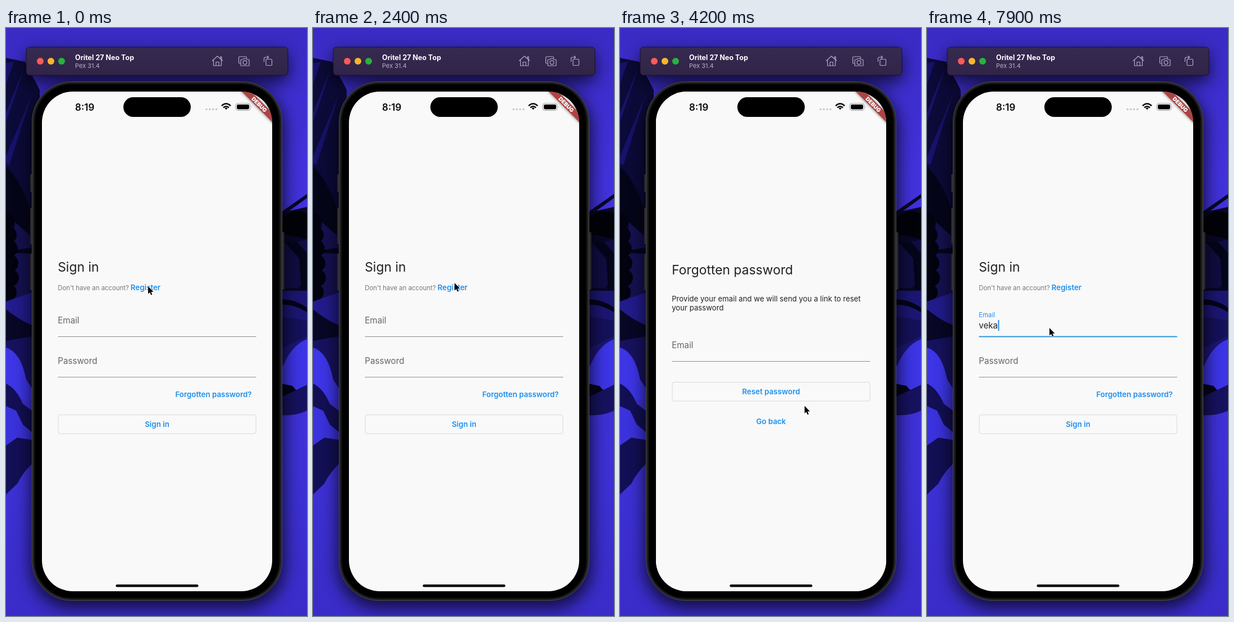
Animation, 536 px wide and 1045 px high, one loop 8 s. Source, as an HTML page:

```html
<!DOCTYPE html>
<html lang="en">
<head>
<meta charset="utf-8">
<title>Sign-in flow</title>
<style>
html, body { margin: 0; width: 100%; height: 100%; overflow: hidden; background: #3a2dcb; }
svg { display: block; width: 100vw; height: 100vh; font-family: Inter, Roboto, sans-serif; }
.h { font-size: 22.9px; fill: #212121; }
.label { font-size: 15.2px; fill: #666; }
.note { font-size: 11.4px; fill: #777; }
.body { font-size: 13.2px; fill: #222; }
.link { font-size: 13.35px; font-weight: 600; fill: #1e8fee; }
.mid { text-anchor: middle; }
.line { stroke: #8e8e8e; }
.btn { fill: none; stroke: #d8d8d8; }
.icon { fill: none; stroke: #b5a9cb; stroke-width: 1.2; stroke-linejoin: round; }
</style>
</head>
<body>
<svg viewBox="0 0 536 1045" preserveAspectRatio="none">
  <defs>
    <linearGradient id="sky" x2="0" y2="1">
      <stop stop-color="#3a2bc4"/><stop offset=".25" stop-color="#4232dc"/>
      <stop offset=".75" stop-color="#3d31d6"/><stop offset="1" stop-color="#3a2cc8"/>
    </linearGradient>
    <linearGradient id="bar" x2="0" y2="1">
      <stop stop-color="#372a51"/><stop offset="1" stop-color="#302447"/>
    </linearGradient>
    <linearGradient id="edge">
      <stop stop-color="#000" stop-opacity="0"/><stop offset="1" stop-color="#000" stop-opacity=".025"/>
    </linearGradient>
    <clipPath id="screen"><rect x="64" y="113" width="410" height="888" rx="55"/></clipPath>
    <filter id="soft" x="-20%" y="-20%" width="140%" height="140%"><feGaussianBlur stdDeviation="15"/></filter>
    <filter id="blur" x="-20%" y="-60%" width="140%" height="220%"><feGaussianBlur stdDeviation="2.5"/></filter>
  </defs>

  <!-- wallpaper -->
  <rect width="536" height="1045" fill="url(#sky)"/>
  <path d="M0 53L34 60 60 110V480H0Z" fill="#0c0a38"/>
  <path d="M0 62L14 60 0 100ZM34 66L0 168V150ZM46 118L6 244 0 240V228Z" fill="#17126a"/>
  <path d="M0 246Q28 272 46 330V395L0 340Z" fill="#05051a"/>
  <path d="M16 345L46 372V480H0Z" fill="#151150"/>
  <path d="M16 395L46 390V401L18 400Z" fill="#05051a"/>
  <g fill="#03030f">
    <circle cx="0" cy="343" r="14"/><circle cx="4" cy="368" r="15"/><circle cx="6" cy="392" r="15"/>
    <circle cx="6" cy="418" r="16"/><circle cx="7" cy="444" r="16"/><circle cx="3" cy="470" r="16"/>
  </g>
  <path d="M0 486L46 470V530H0Z" fill="#221b8c"/>
  <path d="M0 500Q25 520 46 528V565L0 556Z" fill="#080726"/>
  <path d="M0 556L46 548V640H0Z" fill="#17125f"/>
  <path d="M0 568Q26 575 36 625L46 640V660H0Z" fill="#3d35e6"/>
  <path d="M0 632Q18 640 30 668L46 680V775Q30 790 20 810L0 829Z" fill="#130f55"/>
  <path d="M0 672L18 680 30 705 46 718V732L20 728 0 742Z" fill="#3a32dc"/>
  <path d="M490 327L536 295V302L504 325 536 318V470H490Z" fill="#080726"/>
  <path d="M490 340Q512 318 536 330V375L490 365Z" fill="#020209"/>
  <path d="M490 385L536 376V440L520 462H490Z" fill="#100d42"/>
  <path d="M496 380H518L536 400V465H526L522 410Z" fill="#05051a"/>
  <path d="M490 467H536V600H490Z" fill="#1c1673"/>
  <path d="M490 482Q515 482 536 497V505Q510 490 490 492Z" fill="#04041a"/>
  <path d="M490 512L536 520V548L490 570Z" fill="#15115a"/>
  <path d="M490 610Q505 565 536 553V650H490Z" fill="#3d35e6"/>
  <path d="M490 632L510 636 518 645 505 652 490 656Z" fill="#04041a"/>
  <path d="M490 656L536 634V680Q515 690 490 688Z" fill="#17125f"/>

  <!-- window shadow -->
  <g filter="url(#soft)" opacity=".72">
    <rect x="36" y="44" width="466" height="52" rx="6"/>
    <rect x="44" y="106" width="452" height="924" rx="72"/>
  </g>

  <!-- simulator bar -->
  <rect x="36" y="34" width="466" height="50" rx="6" fill="url(#bar)" stroke="#17112b"/>
  <circle cx="61" cy="59" r="6" fill="#fd5c54"/>
  <circle cx="80" cy="59" r="6" fill="#f9b62c"/>
  <circle cx="99" cy="59" r="6" fill="#27b33a"/>
  <text x="123" y="57" font-size="12.5" font-weight="700" fill="#fff">Oritel 27 Neo Top</text>
  <text x="123" y="71" font-size="11" fill="#b9b0c6">Pex 31.4</text>
  <g class="icon">
    <path d="M367 58.5L376.5 50 386 58.5M382 54.5V51H384V56.5M369.5 57V67H383.5V57M374 67V60.5H379V67"/>
    <path d="M417.5 63H416Q414.5 63 414.5 61.5V52.5Q414.5 51 416 51H427Q428.5 51 428.5 52.5V54"/>
    <path d="M419 56H422L423 54.5H428L429 56H432Q433 56 433 57V66Q433 67 432 67H419Q418 67 418 66V57Q418 56 419 56Z"/>
    <circle cx="425.5" cy="61.2" r="3.4"/>
    <rect x="463" y="55.5" width="10.5" height="11" rx="1.2"/>
    <path d="M459.5 60V54.5Q459.5 52 462 52H467M465 49.5L467.5 52 465 54.5"/>
  </g>

  <!-- phone body -->
  <path d="M45 260V291M45 320V384M45 401V466M493.5 363V465" stroke="#28282b" stroke-width="4"/>
  <rect x="46.5" y="95.5" width="445" height="922" rx="71" fill="#222223" stroke="#4a4a4c"/>
  <rect x="51" y="99.5" width="436" height="914" rx="67" fill="#000" stroke="#0d0d0d" stroke-width="2"/>

  <g clip-path="url(#screen)">
    <rect x="64" y="113" width="410" height="888" fill="#f9f9f9"/>
    <g id="signIn"></g>
    <g id="register"></g>
    <g id="forgot"></g>
    <g transform="translate(474 113) rotate(45)">
      <rect x="-55" y="27" width="110" height="11.5" opacity=".55" filter="url(#blur)"/>
      <rect x="-55" y="26.7" width="110" height="11.5" fill="#ae4343"/>
      <text class="mid" y="36" font-size="9.7" font-weight="900" fill="#fff">DEBUG</text>
    </g>
  </g>

  <!-- status bar -->
  <text x="123" y="147" font-size="17" font-weight="600" fill="#0a0a0a">8:19</text>
  <rect x="209" y="123" width="120" height="35" rx="17.5"/>
  <path d="M357 144.5H376" stroke="#c6c6c6" stroke-width="3.6" stroke-linecap="round" stroke-dasharray="0 5.9"/>
  <g fill="none" stroke="#0a0a0a" stroke-width="2.5">
    <path d="M384 138.3Q392 130.8 400 138.3M387 141.6Q392 137 397 141.6"/>
    <path d="M389.3 142.6Q392 140.6 394.7 142.6L392 145.3Z" fill="#0a0a0a" stroke="none"/>
  </g>
  <rect x="409" y="134" width="26" height="12.5" rx="4" fill="none" stroke="#999"/>
  <rect x="411" y="136" width="22" height="8.5" rx="2.4"/>
  <path d="M437 138.3Q438.8 140.3 437 142.3Z" fill="#999"/>
  <rect x="195.5" y="989" width="147" height="4.5" rx="2.25"/>

  <path id="pointer" d="M0 0V13.5L3.1 10.7 5.3 15.6 7.4 14.7 5.3 9.9H9.5Z" stroke="#fff" stroke-width="1.2" paint-order="stroke"/>
</svg>

<script>
const LEFT = 92.2, MID = 269, WIDTH = 410;
const $ = id => document.getElementById(id);
const text = (cls, x, y, s) => `<text class="${cls}" x="${x}" y="${y}">${s}</text>`;
const rule = y => `<path class="line" d="M92.5 ${y}H445.5"/>`;
const field = (y, s) => text('label', LEFT, y, s) + rule(y + 23.5);
const button = (y, s) =>
  `<rect class="btn" x="93" y="${y + .5}" width="352" height="33.5" rx="3.5"/>` + text('link mid', MID, y + 22, s);
const header = (y, title, note, x, link) =>
  text('h', LEFT, y, title) + text('note', LEFT, y + 33, note) + text('link', x, y + 33, link);

$('signIn').innerHTML = header(433, 'Sign in', "Don't have an account?", 221.8, 'Register') +
  `<g id="email">${text('label', 0, 0, 'Email')}</g><path id="underline" class="line" d="M92.5 548.5H445.5"/>` +
  `<text id="typed" class="label" x="${LEFT}" y="533.5" style="fill:#212121"></text>` +
  '<rect id="caret" y="519" width="2" height="19" fill="#1e8fee"/>' +
  field(597, 'Password') +
  '<text class="link" x="437.5" y="655.5" text-anchor="end">Forgotten password?</text>' +
  button(687, 'Sign in');

$('register').innerHTML = header(424, 'Register', 'Already have an account?', 233.5, 'Sign in') +
  field(516, 'Email') + field(588, 'Password') + field(652, 'Confirm password') + button(696, 'Register');

$('forgot').innerHTML = '<rect x="44" y="113" width="20" height="888" fill="url(#edge)"/>' +
  '<rect x="64" y="113" width="410" height="888" fill="#f9f9f9"/>' +
  text('h', LEFT, 437.5, 'Forgotten password') +
  text('body', LEFT, 486, 'Provide your email and we will send you a link to reset') +
  text('body', LEFT, 502, 'your password') + field(569, 'Email') + button(629, 'Reset password') +
  '<rect id="tap" x="147" y="682" width="244" height="35" rx="3" fill="#dce9f6"/>' +
  text('link mid', MID, 704, 'Go back');

// time, x, y of the pointer
const path = [
  [0, 253, 459], [400, 253, 459], [1000, 245, 461], [1500, 252, 454], [2400, 252, 453], [2700, 254, 455],
  [3350, 373, 653], [3900, 373, 653], [4600, 261, 700], [5250, 261, 700], [6100, 233, 540],
  [6600, 230, 537], [7200, 219, 533], [8000, 218, 533]
];
const clamp = v => Math.min(1, Math.max(0, v));
const mix = (a, b, k) => a + (b - a) * k;
const smooth = k => k * k * (3 - 2 * k);

// cubic bezier (.35,.91,.33,.97), used for page slides
function slide(x) {
  const bez = (a, b, s) => 3 * (1 - s) ** 2 * s * a + 3 * (1 - s) * s * s * b + s ** 3;
  let lo = 0, hi = 1;
  for (let i = 0; i < 20; i++) {
    const s = (lo + hi) / 2;
    if (bez(.35, .33, s) < x) lo = s; else hi = s;
  }
  return bez(.91, .97, lo);
}
const show = (id, on) => $(id).setAttribute('visibility', on ? 'inherit' : 'hidden');
const move = (id, x, y = 0, k = 1) => $(id).setAttribute('transform', `translate(${x} ${y}) scale(${k})`);

const FOCUS = 6600, KEYS = [7300, 7500, 7700, 7850], NAME = 'veka';

function draw(t) {
  const i = path.findIndex(p => p[0] > t), [t0, x0, y0] = path[i - 1], [t1, x1, y1] = path[i];
  const k = smooth((t - t0) / (t1 - t0));
  move('pointer', mix(x0, x1, k), mix(y0, y1, k));

  const registering = t >= 400 && t < 1500;
  show('register', registering);
  show('signIn', !registering);

  const open = slide(clamp((t - 3570) / 400)) - slide(clamp((t - 5110) / 400));
  move('signIn', -open * WIDTH / 3);
  move('forgot', (1 - open) * WIDTH);
  show('forgot', open > .0005);
  show('tap', open > .0005 && t > 5000);

  const float = smooth(clamp((t - FOCUS) / 167)), focused = t >= FOCUS;
  move('email', LEFT, mix(525.3, 513.5, float), mix(1, .75, float));
  $('email').firstChild.style.fill = focused ? '#1e8fee' : '';
  $('underline').style.stroke = focused ? '#2f96dc' : '';
  $('underline').style.strokeWidth = focused ? 2 : 1;

  const count = KEYS.filter(key => t >= key).length;
  $('typed').textContent = NAME.slice(0, count);
  $('caret').setAttribute('x', LEFT + .3 + (count ? $('typed').getComputedTextLength() : 0));
  show('caret', focused && (count || (t - FOCUS) % 1000 < 500));
}
function frame() {
  draw(performance.now() % 8000);
  requestAnimationFrame(frame);
}
frame();
</script>
</body>
</html>
```
